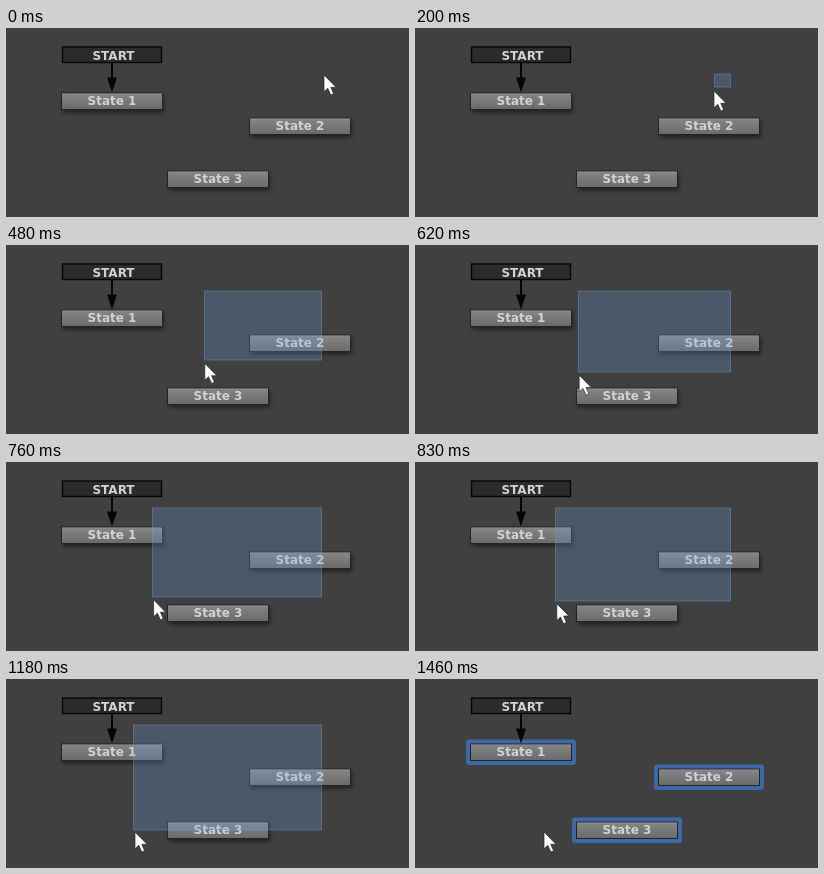
An HTML page that plays this animation: 403 px wide and 189 px high, repeating every 1960 ms.

```html
<!DOCTYPE html>
<html lang="en">
<head>
<meta charset="utf-8">
<title>Selecting states</title>
<style>
  html, body { margin: 0; width: 100%; height: 100%; overflow: hidden; background: #404040; }
  svg { display: block; width: 403px; height: 189px; }
  text { font: bold 12px "DejaVu Sans", sans-serif; text-anchor: middle; fill: #d2d2d2; }
</style>
</head>
<body>
<svg viewBox="0 0 403 189">
  <defs>
    <linearGradient id="face" x2="0" y2="1">
      <stop offset="0" stop-color="#868686"/>
      <stop offset="1" stop-color="#6a6a6a"/>
    </linearGradient>
    <filter id="blur" x="-10%" y="-50%" width="120%" height="200%">
      <feGaussianBlur stdDeviation="1.9"/>
    </filter>
  </defs>
  <rect width="403" height="189" fill="#404040"/>
  <rect x="56.5" y="19" width="99" height="15.5" fill="#2a2b2a" stroke="#060606" stroke-width="1.4"/>
  <text x="107.5" y="31.5">START</text>
  <g id="nodes"></g>
  <path d="M106 35V54" stroke="#050505" stroke-width="2"/>
  <path d="M101 49.5H111L106 64.5Z" fill="#050505"/>
  <rect id="band" fill="#68a0e0" fill-opacity=".25" stroke="#78a0dc" stroke-opacity=".4"/>
  <path id="cursor" d="M0 0V16.8L3.8 13.3L6.8 20L9.6 18.8L6.8 12.3H12Z"
        fill="#fff" stroke="#2a2a2a" stroke-width=".7" stroke-linejoin="round"/>
</svg>
<script>
const LOOP = 1960, DRAG = 200, STEP = 70, SELECT = 1460;
const ORIGIN = { x: 316, y: 45.5 };
const REST = [318, 47];

// Free corner of the selection band at each drag step
const corners = [
  [299, 59], [277, 76], [253, 93], [224, 105], [198, 115],
  [179, 122], [163, 127], [151, 131], [146, 135], [140, 139],
  [135, 142], [131, 145], [129, 148], [128, 150], [127, 151]
];
const last = corners.length - 1;

const byId = id => document.getElementById(id);
const setAttrs = (el, attrs) => {
  for (const key in attrs) el.setAttribute(key, attrs[key]);
};

const node = (label, x, y) => `
  <g transform="translate(${x} ${y})">
    <rect class="shadow" x="2" y="3" width="101" height="17" fill="#000" opacity=".5" filter="url(#blur)"/>
    <rect class="halo" x="-4" y="-4" width="110" height="25.5" rx="3" fill="#3e69a8"/>
    <rect x=".5" y=".5" width="101" height="16.5" fill="url(#face)" stroke="#242424"/>
    <path d="M1 1.5H101" stroke="#999" stroke-opacity=".5"/>
    <text x="51" y="12.5">${label}</text>
  </g>`;

byId("nodes").innerHTML =
  node("State 1", 55, 64.5) + node("State 2", 243, 89.5) + node("State 3", 161, 142.5);

const shadows = document.querySelectorAll(".shadow");
const halos = document.querySelectorAll(".halo");
const show = (el, on) => el.setAttribute("visibility", on ? "visible" : "hidden");

function draw(time) {
  const dragging = time >= DRAG && time < SELECT;
  const selected = time >= SELECT;
  const step = Math.min(last, Math.floor((time - DRAG) / STEP));
  let [tipX, tipY] = REST;

  if (step >= 0) {
    const [x, y] = corners[step];
    // The band catches up with the pointer as it slows
    tipX = x + Math.min(2, step / 5);
    tipY = y + 4 - step / 7;
    setAttrs(byId("band"), {
      x: x + .5, y: ORIGIN.y + .5,
      width: ORIGIN.x - x - 1, height: y - ORIGIN.y - .5
    });
  }
  show(byId("band"), dragging);
  shadows.forEach(el => show(el, !selected));
  halos.forEach(el => show(el, selected));
  byId("cursor").setAttribute("transform", `translate(${tipX} ${tipY})`);
}

const start = performance.now();
function tick() {
  draw((performance.now() - start) % LOOP);
  requestAnimationFrame(tick);
}
tick();
</script>
</body>
</html>
```
